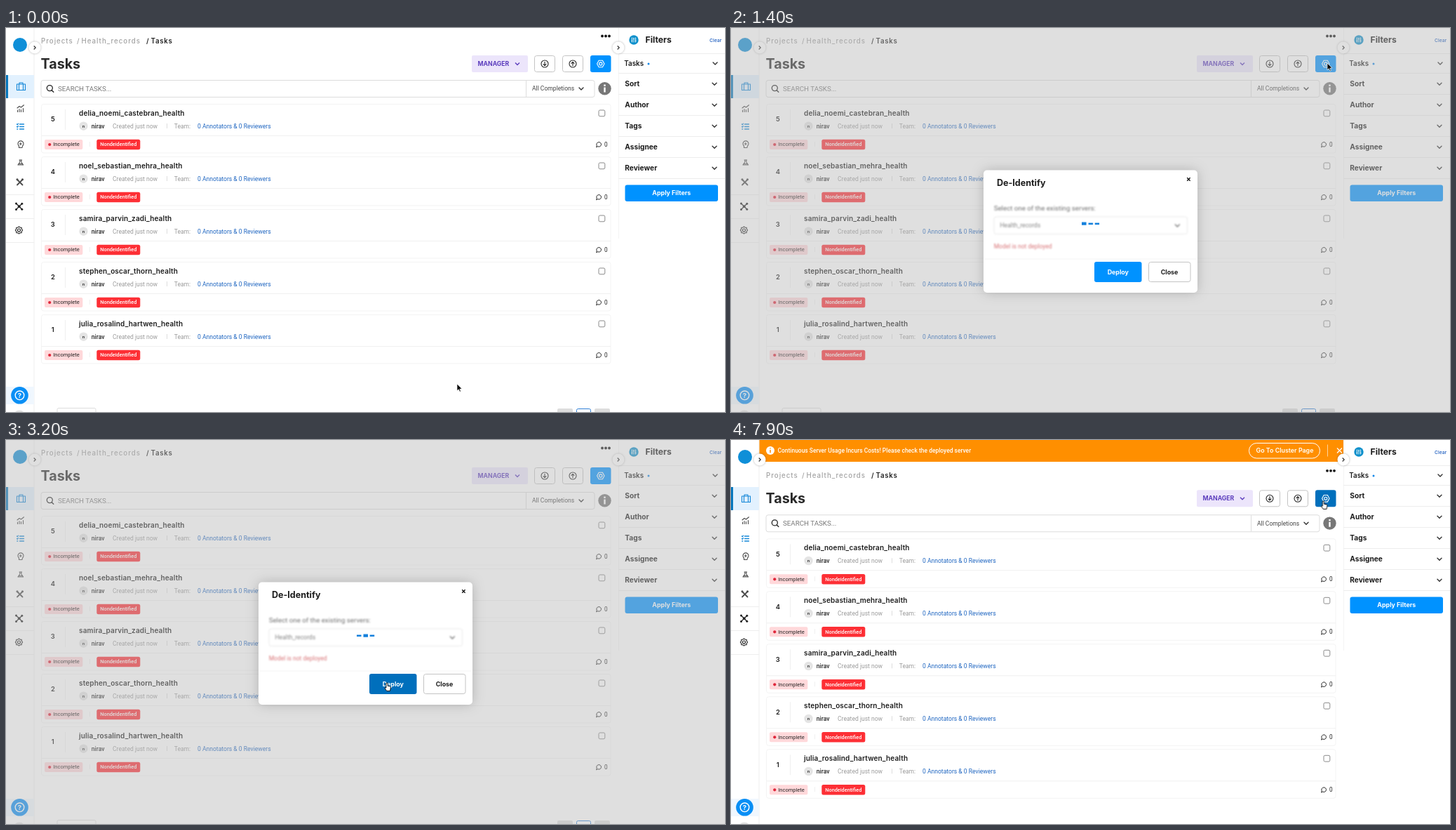
These frames come from a looping animation (1025 by 547 pixels, 8000 ms). An HTML page:

```html
<!DOCTYPE html>
<html lang="en">
<head>
<meta charset="utf-8">
<title>Tasks</title>
<style>
html, body { margin: 0; width: 100%; height: 100%; overflow: hidden; background: #fff; }
svg { display: block; }
text { font: 8.57px Roboto, sans-serif; fill: #222; white-space: pre; }
.h { font-family: Inter, sans-serif; font-weight: 700; fill: #1d1d1d; }
.mid { text-anchor: middle; }
.s10 { font-size: 10.2px; }
.btn { font-size: 8.9px; }
.crumb { font-size: 9.7px; font-weight: 500; letter-spacing: 1px; fill: #a2a2a2; }
.name { font-size: 10px; font-weight: 600; letter-spacing: .15px; }
.m { font-weight: 500; }
.mute { fill: #9b9b9b; }
.link { fill: #1f66c1; }
.white { fill: #fff; }
.line { stroke: #ededed; fill: none; }
.ico { fill: none; stroke: #4a4a4a; stroke-linecap: round; stroke-linejoin: round; }
.box { fill: #fff; stroke: #c4c4c4; }
.toggle { fill: #fff; filter: drop-shadow(0 0 1.5px rgba(0,0,0,.3)); }

.a { animation: 8s step-end infinite; }
.page { animation-name: page; }
.banner { animation-name: banner; }
.hover { animation-name: hover; fill: #fff; stroke: #e2e2e2; filter: drop-shadow(0 1.5px 2px rgba(0,0,0,.38)); }
.gear { animation-name: gear; fill: #0092ff; }
.deploy { animation-name: deploy; fill: #0092ff; }
.dialog { animation-name: dialog; }
.form { animation-name: form; }
.loader { animation-name: loader; }
.cursor { animation-name: move; }
.arrow { animation-name: arrow; }
.hand { animation-name: hand; }
.ghost { animation-name: ghost; }
.card { fill: #fff; filter: drop-shadow(0 0 9px rgba(0,0,0,.2)); }
.bar { fill: #1480dc; transform-box: fill-box; transform-origin: center; animation: bar .8s step-end infinite both; }

@keyframes page { 0% { transform: none } 43.75%, 100% { transform: translateY(32.3px) } }
@keyframes banner { 0% { opacity: 0 } 43.75%, 100% { opacity: 1 } }
@keyframes hover {
  0% { opacity: 0; transform: translateY(300px) }
  2.5% { opacity: 1; transform: translateY(300px) }
  5% { opacity: 1; transform: translateY(225px) }
  6.25% { opacity: 1; transform: translateY(150px) }
  7.5% { opacity: 1; transform: translateY(75px) }
  8.75% { opacity: 1; transform: none }
  10% { opacity: 0; transform: none }
  45% { opacity: 1; transform: translateY(150px) }
  90% { opacity: 1; transform: translateY(75px) }
  91.25% { opacity: 1; transform: none }
  95%, 100% { opacity: 0; transform: none }
}
@keyframes gear { 0%, 17.5% { fill: #0092ff } 12.5%, 97.5%, 100% { fill: #006fbc } }
@keyframes deploy { 0% { fill: #0092ff } 30%, 100% { fill: #006fbc } }
@keyframes dialog { 0%, 45%, 100% { opacity: 0 } 17.5% { opacity: 1 } 43.75% { opacity: .4 } }
@keyframes form {
  0%, 40%, 100% { filter: blur(1.3px); opacity: .65 }
  22.5% { filter: none; opacity: 1 }
}
@keyframes loader { 0%, 40%, 100% { opacity: 1 } 22.5% { opacity: 0 } }
@keyframes bar { 0% { transform: scaleY(1.8) } 25%, 100% { transform: none } }
@keyframes arrow { 0%, 17.5%, 45% { opacity: 1 } 12.5%, 30%, 97.5%, 100% { opacity: 0 } }
@keyframes hand { 0%, 17.5%, 45% { opacity: 0 } 12.5%, 30%, 97.5%, 100% { opacity: 1 } }
@keyframes ghost { 0%, 90%, 100% { opacity: 0 } 88.75% { opacity: 1 } }
@keyframes move {
  0% { transform: translate(643px,507px) }
  1.25% { transform: translate(647px,499px) }
  2.5% { transform: translate(657px,477px) }
  3.75% { transform: translate(676px,434px) }
  5% { transform: translate(705px,371px) }
  6.25% { transform: translate(738px,299px) }
  7.5% { transform: translate(772px,224px) }
  8.75% { transform: translate(805px,152px) }
  10% { transform: translate(830px,97px) }
  11.25% { transform: translate(845px,66px) }
  12.5% { transform: translate(851px,50px) }
  17.5% { transform: translate(850px,50px) }
  18.75% { transform: translate(846px,53px) }
  20% { transform: translate(822px,68px) }
  21.25% { transform: translate(765px,106px) }
  22.5% { transform: translate(687px,159px) }
  23.75% { transform: translate(598px,231px) }
  26.25% { transform: translate(589px,249px) }
  27.5% { transform: translate(575px,281px) }
  28.75% { transform: translate(559px,317px) }
  30% { transform: translate(548px,338px) }
  31.25% { transform: translate(543px,346px) }
  45% { transform: translate(541.5px,346px) }
  88.75% { transform: translate(545.5px,341px) }
  90% { transform: translate(625px,268px) }
  91.25% { transform: translate(741px,192px) }
  93.75% { transform: translate(772px,160px) }
  95% { transform: translate(806px,126px) }
  96.25% { transform: translate(832px,101px) }
  97.5% { transform: translate(843px,90px) }
  98.75%, 100% { transform: translate(844.5px,87px) }
}
</style>
</head>
<body>
<svg width="1025" height="547" viewBox="0 0 1025 547">
<defs>
  <path id="chev" d="M-3-1.5 0 1.5 3-1.5" fill="none" stroke="#333" stroke-width="1.4" stroke-linecap="round"/>
  <path id="next" d="M-1.3-2.5 1.2 0-1.3 2.5" fill="none" stroke="#333" stroke-width="1.2"/>
  <path id="arrow" d="M0 0V9.8L2.3 7.8 3.9 11.2 5.4 10.5 3.9 7.2 7 7Z" stroke="#fff" stroke-width=".7"/>
  <path id="cog" d="M0-5.2 1.6-3.8 3.7-3.7 3.8-1.6 5.2 0 3.8 1.6 3.7 3.7 1.6 3.8 0 5.2-1.6 3.8-3.7 3.7-3.8 1.6-5.2 0-3.8-1.6-3.7-3.7-1.6-3.8ZM2 0A2 2 0 1 0-2 0 2 2 0 1 0 2 0"/>
</defs>

<g class="a page">
  <text class="h crumb" x="50" y="22">Projects</text>
  <text class="h crumb" x="101" y="22">/</text>
  <text class="h crumb" x="107.5" y="22">Health_records</text>
  <text class="h crumb" x="200" y="22" style="fill:#222;font-weight:600">/</text>
  <text class="h crumb" x="206.5" y="22" style="fill:#222;font-weight:600;letter-spacing:.7px">Tasks</text>
  <g fill="#111"><circle cx="850" cy="11.5" r="1.9"/><circle cx="855" cy="11.5" r="1.9"/><circle cx="860" cy="11.5" r="1.9"/></g>
  <text class="h" x="49.5" y="58" style="font-size:19.7px;fill:#2a2a2a">Tasks</text>

  <rect x="664" y="39" width="80" height="24" rx="2" fill="#ece5fb"/>
  <text class="h" x="672.5" y="54" style="font-size:8.7px;fill:#5d3fbe">MANAGER</text>
  <path d="M726 49.5l3 3 3-3" fill="none" stroke="#5d3fbe" stroke-width="1.4"/>
  <rect class="box" x="753.5" y="39.5" width="29" height="23" rx="3"/>
  <rect class="box" x="793.5" y="39.5" width="29" height="23" rx="3"/>
  <g class="ico" style="stroke:#222" stroke-width="1.1">
    <circle cx="768" cy="51" r="5"/><path d="M768 48.3v5M766 51.6l2 2 2-2"/>
    <circle cx="808" cy="51" r="5"/><path d="M808 53.7v-5M806 50.4l2-2 2 2"/>
  </g>
  <rect class="a gear" x="833" y="39" width="29.5" height="24" rx="3"/>
  <g fill="none" stroke="#fff" stroke-width="1.1"><path d="M845.2 46.2h5.2l2.6 4.8-2.6 4.8h-5.2l-2.6-4.8Z"/><circle cx="847.8" cy="51" r="2.1"/></g>

  <rect class="box" x="50" y="74.5" width="789" height="24" rx="3" style="stroke:#dcdcdc"/>
  <path class="line" d="M741.5 75v23" style="stroke:#dcdcdc"/>
  <g class="ico" style="stroke:#222" stroke-width="1.3"><circle cx="62.3" cy="85.6" r="4"/><path d="M65.3 88.7l2.5 2.5"/></g>
  <text x="74" y="89.8" style="font-size:9.76px;fill:#777">SEARCH TASKS...</text>
  <text x="750" y="89.3" style="fill:#444">All Completions</text>
  <use href="#chev" x="820" y="86.5"/>
  <circle cx="853.5" cy="86.3" r="9.2" fill="#777"/>
  <path d="M852.3 84.5h2.4v7h-2.4ZM852.3 80.6h2.4v2.3h-2.4Z" fill="#fff"/>

  <g id="cards"></g>
  <rect class="a hover" x="50.5" y="108.5" width="811.5" height="69.5" rx="3"/>
  <g id="rows"></g>

  <rect class="box" x="73" y="541.5" width="55" height="20" rx="2" style="stroke:#ddd"/>
  <rect x="786" y="542" width="22" height="20" rx="2" fill="#ddd"/>
  <rect x="839" y="542" width="22" height="20" rx="2" fill="#ddd"/>
  <rect x="813.5" y="542.5" width="20" height="20" rx="2" fill="#fff" stroke="#2f7fd6"/>
</g>

<g class="a banner">
  <rect x="40" width="833" height="31" fill="#ff8f00"/>
  <circle cx="56" cy="15" r="6" fill="#fff"/>
  <path d="M56 14v4.2M56 11.3v1.2" stroke="#ff8f00" stroke-width="1.5"/>
  <text class="white m" x="66.5" y="18" style="font-size:8.45px">Continuous Server Usage Incurs Costs! Please check the deployed server</text>
  <rect x="738.5" y="4.5" width="101" height="21.5" rx="10.7" fill="none" stroke="#fff"/>
  <text class="h btn white mid" x="789.5" y="18.3" style="font-weight:600">Go To Cluster Page</text>
  <path d="M850.5 6.5v17" stroke="#ffd49a"/>
  <path d="M864 11.5l7 7M871 11.5l-7 7" stroke="#fff" stroke-width="1.2"/>
</g>

<rect width="40" height="547" fill="#fff"/>
<path class="line" d="M40 0V547M0 237.5H40M0 271.5H40M0 305.5H40" style="stroke:#eee"/>
<circle cx="20" cy="24" r="10" fill="#0f8fd8"/>
<rect y="67" width="40" height="33" fill="#e2f1fe"/>
<rect y="67" width="3" height="33" fill="#0878be"/>
<g class="ico" style="stroke:#1588d8" stroke-width="1.1">
  <path d="M15.5 80h12v8.5h-12ZM19 80v-2h5v2M18.5 80v8.5M24.5 80v8.5"/>
  <path d="M19.5 137h6M19.5 140.5h6M19.5 144h6M15.5 137l.8.8 1.3-1.6M15.5 140.5l.8.8 1.3-1.6M15.8 144h1" stroke-width="1.3"/>
</g>
<g class="ico" stroke-width="1.1">
  <path d="M16.5 119.5v-2.5M19 119.5v-4M21.5 119.5v-3M24.5 119.5v-5M16 114l3-2.5 2.5 1.5 4-3.2"/>
  <path d="M18.5 170.5v-2.5a4 4 0 1 1 5 0l-.5 2.5ZM20.8 163.5v3M19.3 165h3"/>
  <path d="M19 188h3.6M19.8 188v3l-2.8 4h7.6l-2.8-4v-3M18.5 193.5h4.5"/>
  <path d="M16 216l7.5 7.5M23.5 216l-7.5 7.5" stroke-width="1.8"/><circle cx="16" cy="215.8" r="1"/><circle cx="23.5" cy="215.8" r="1"/>
  <path d="M15 250.5l7.5 7.5M22.5 250.5l-7.5 7.5" style="stroke:#222" stroke-width="1.3"/>
</g>
<g fill="#222"><circle cx="14.5" cy="250" r="1.5"/><circle cx="22.8" cy="250.2" r="1.5"/><circle cx="14.5" cy="258.5" r="1.5"/><circle cx="22.8" cy="258.3" r="1.5"/><circle cx="18.7" cy="254.2" r="1.9"/></g>
<use href="#cog" x="18.5" y="288" class="ico" style="stroke:#222" stroke-width="1.1"/>
<rect y="511" width="40" height="25" fill="#f0f7fe"/>
<circle cx="19.5" cy="523.3" r="12.3" fill="#0a8ff5"/>
<circle cx="19.5" cy="523.3" r="6.3" fill="none" stroke="#fff" stroke-width="1.4"/>
<text class="h mid white" x="19.5" y="526.7" style="font-size:9.5px">?</text>
<circle cx="19" cy="553" r="8.5" fill="#e2e2e2"/>

<rect x="873" width="152" height="547" fill="#fff"/>
<path class="line" d="M873.5 0V300" style="stroke:#f4f4f4"/>
<circle cx="895" cy="17" r="6.7" fill="#0b8fcb"/>
<path d="M892.4 13.5v7M895 13.5v7M897.6 13.5v7M891.6 18.3h1.6M894.2 15.5h1.6M896.8 18.3h1.6" stroke="#fff" stroke-width=".9"/>
<text class="h" x="911.5" y="21.3" style="font-size:12.2px">Filters</text>
<text class="h" x="1003" y="19.5" style="font-size:6.8px;font-weight:500;fill:#1f5fc0">Clear</text>
<g id="filters"></g>
<circle cx="916" cy="51" r="1.5" fill="#1588e8"/>
<rect x="882.5" y="223.5" width="132.5" height="23.5" rx="3" fill="#0092ff"/>
<text class="h btn white mid" x="948.8" y="238.3">Apply Filters</text>

<circle class="toggle" cx="41" cy="28" r="8.5"/><use href="#next" x="41" y="28"/>
<circle class="toggle" cx="873" cy="28" r="8.5"/><use href="#next" x="873" y="28"/>

<g class="a dialog">
  <rect width="1025" height="547" fill="rgba(185,185,185,.45)"/>
  <rect class="card" x="360" y="202.5" width="305" height="174.5" rx="5"/>
  <text class="h" x="379" y="225" style="font-size:12.5px">De-Identify</text>
  <path d="M650.2 213.3l4.4 4.4M654.6 213.3l-4.4 4.4" stroke="#111" stroke-width="1.4"/>
  <path class="line" d="M361 329H664" style="stroke:#f5f5f5"/>
  <g class="a form">
    <text x="374.7" y="260.3" style="font-size:9.72px">Select one of the existing servers:</text>
    <rect class="box" x="375" y="269" width="275.5" height="24.5" rx="3" style="stroke:#ddd"/>
    <text x="383.5" y="284.3" style="fill:#444">Health_records</text>
    <use href="#chev" x="636.3" y="281.5"/>
    <text x="374.7" y="314.2" style="fill:#c42b30;font-size:8.5px">Model is not deployed</text>
  </g>
  <g class="a loader">
    <rect class="bar" x="500" y="277.5" width="6.5" height="2.5" style="animation-delay:-.2s"/>
    <rect class="bar" x="509.5" y="277.5" width="6.5" height="2.5" style="animation-delay:0s"/>
    <rect class="bar" x="518.7" y="277.5" width="6.5" height="2.5" style="animation-delay:.2s"/>
  </g>
  <rect class="a deploy" x="518" y="333" width="67.5" height="29" rx="3"/>
  <text class="h btn white mid" x="551.8" y="350.5">Deploy</text>
  <rect class="box" x="595.5" y="333.5" width="59.5" height="28" rx="3"/>
  <text class="h btn mid" x="625" y="350.5">Close</text>
</g>

<use class="a ghost" href="#arrow" x="541.5" y="346"/>
<g class="a cursor">
  <use class="a arrow" href="#arrow"/>
  <path class="a hand" d="M-1.1 1.1Q-1.1 0 0 0T1.1 1.1V4.2L4.6 5Q5.7 5.3 5.4 6.6L4.6 11.4H-.3L-2.9 7.7Q-3 6.2-1.1 7.1Z" fill="#fff" stroke="#000" stroke-width=".9"/>
</g>
</svg>
<script>
const $ = id => document.getElementById(id);
const names = ['delia_noemi_castebran', 'noel_sebastian_mehra', 'samira_parvin_zadi', 'stephen_oscar_thorn', 'julia_rosalind_hartwen'];
const user = 'nirav';
const at = i => `transform="translate(0 ${i * 75})"`;

const card = (_, i) => `<rect ${at(i)} x="50.5" y="108.5" width="811.5" height="69.5" rx="3" fill="#fff" stroke="#f3f3f3"/>`;

const row = (name, i) => `<g ${at(i)}>
  <path class="line" d="M51 153.5H862M84.5 116V145M119.5 162V169" style="stroke:#f0f0f0"/>
  <path class="line" d="M229.5 136V143" style="stroke:#ddd"/>
  <text class="h mid" x="66.8" y="133.3" style="font-size:9.4px;font-weight:600">${names.length - i}</text>
  <text class="h name" x="104" y="124.6">${name}_health</text>
  <circle cx="110.5" cy="139.7" r="6.2" fill="#e4e4e4"/>
  <text class="mid m" x="110.5" y="141.9" style="font-size:6.2px">${user[0]}</text>
  <text class="m" x="121.8" y="142.6">${user}</text>
  <text class="mute" x="152" y="142.6">Created just now</text>
  <text class="mute" x="239.7" y="142.6">Team:</text>
  <text class="link" x="273" y="142.6">0 Annotators &amp; 0 Reviewers</text>
  <rect x="55" y="159" width="54.3" height="14" rx="2" fill="#ffd8da"/>
  <circle cx="62.2" cy="166" r="2.1" fill="#e0263a"/>
  <text x="67.3" y="168.4" style="font-size:7.5px">Incomplete</text>
  <rect x="129.3" y="158.7" width="62" height="14.5" rx="2.5" fill="#fd2f35"/>
  <text class="white m mid" x="160.3" y="168.4" style="font-size:7.3px">Nondeidentified</text>
  <rect x="845" y="117" width="8.8" height="8.8" rx="1.8" fill="#fff" stroke="#8a8a8a"/>
  <path class="ico" d="M841.8 169.5l.4-2.2a3.3 3.3 0 1 1 1.6 1.6Z" style="stroke:#222"/>
  <text x="853" y="169" style="font-size:8.2px">0</text>
</g>`;

const filter = (label, i) => {
  const y = i ? 49.5 + i * 30 : 50.3;
  return `<text class="h s10" x="${i ? 882.3 : 881.3}" y="${y + 3.6}" ${i ? '' : 'style="font-size:9.8px;font-weight:600"'}>${label}</text>
  <use href="#chev" x="${i ? 1010 : 1011}" y="${y + .3}"/><path class="line" d="M873 ${64.5 + i * 30}H1025"/>`;
};

$('cards').innerHTML = names.map(card).join('');
$('rows').innerHTML = names.map(row).join('');
$('filters').innerHTML = '<path class="line" d="M873 36.5H1025"/>' +
  ['Tasks', 'Sort', 'Author', 'Tags', 'Assignee', 'Reviewer'].map(filter).join('');
</script>
</body>
</html>
```
